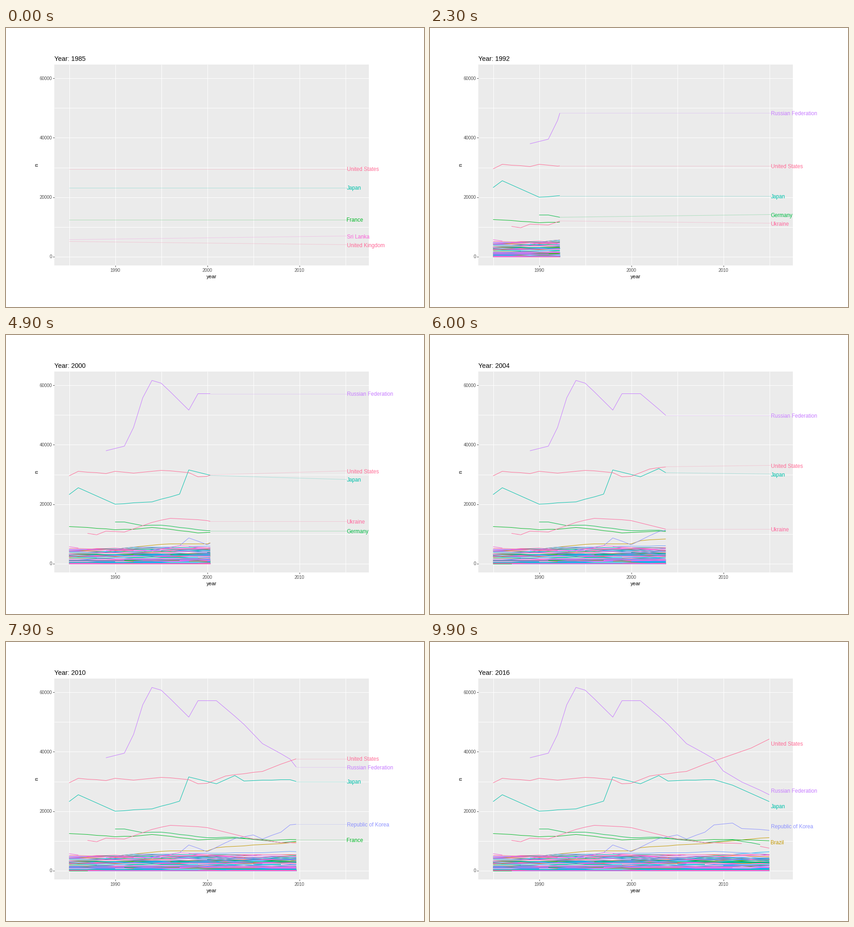
These frames come from a looping animation (917x611 px, 10000 ms). A matplotlib script:

```python
import numpy as np
import matplotlib.pyplot as plt
from matplotlib.animation import FuncAnimation
from matplotlib.patches import Rectangle

W, H, DPI = 917, 611, 64
PX = 72 / DPI                     # one pixel in points
FRAMES, FIRST, LAST = 100, 1985, 2015
YEARS = np.arange(FIRST, LAST + 1)
KEYS = np.round(np.arange(32) * (FRAMES - 1) / 31)   # frame of each year
LABEL_X, GAP, DODGE = 747.5, 18.5, 9.5

plt.rcParams["font.family"] = "Liberation Sans"
rng = np.random.default_rng(12)
fig = plt.figure(figsize=(W / DPI, H / DPI), dpi=DPI, facecolor="white")
ax = fig.add_axes([0, 0, 1, 1])
ax.set(xlim=(0, W), ylim=(H, 0))
ax.axis("off")


def year_x(year):
    return 138.4 + 20.2 * (year - FIRST)


def row(y):
    """Centre of the pixel that holds y, to keep flat lines crisp."""
    return np.floor(y) + 0.5


def hcl(hue, c=100, l=65):
    """Polar LUV colour, as in an evenly spaced hue palette."""
    a = np.radians(hue)
    u = c * np.cos(a) / (13 * l) + 0.1978
    v = c * np.sin(a) / (13 * l) + 0.4683
    y = ((l + 16) / 116) ** 3
    xyz = np.array([9 * y * u / (4 * v), y, y * (12 - 3 * u - 20 * v) / (4 * v)])
    m = np.array([[3.2406, -1.5372, -0.4986],
                  [-0.9689, 1.8758, 0.0415],
                  [0.0557, -0.2040, 1.0570]])
    rgb = np.clip(m @ xyz, 0, 1)
    return np.where(rgb > 0.0031308, 1.055 * rgb ** (1 / 2.4) - 0.055, 12.92 * rgb)


def text(x, y, s, px, color="black", **kw):
    kw.setdefault("va", "baseline")
    return ax.text(x, y, s, fontsize=px * PX, color=color, zorder=9, **kw)


def rule(xs, ys, color, z=1, **kw):
    return ax.plot(xs, ys, color=color, lw=PX, solid_capstyle="butt",
                   zorder=z, **kw)[0]


# Panel, grid and axes
ax.add_patch(Rectangle((106, 80), 690, 440, fc="#EBEBEB", ec="none", zorder=0))
for year in range(1985, 2016, 5):
    x = row(year_x(year))
    rule([x, x], [80, 520], "white")
    if year in (1990, 2000, 2010):
        rule([x, x], [520, 523], "#333333")
        text(x, 534, str(year), 9.9, "#4D4D4D", ha="center")
for n in range(0, 60001, 10000):
    y = row(500.7 - n * 130.4 / 20000)
    rule([106, 796], [y, y], "white")
    if n % 20000 == 0:
        rule([103, 106], [y, y], "#333333")
        text(101, y + 4, str(n), 9.9, "#4D4D4D", ha="right")
text(451, 548.5, "year", 11.4, ha="center")
text(67, 300, "n", 11.4, ha="center", va="center", rotation=90)
title = text(105.5, 71.5, "", 14.2)

# Series: heights are stage pixels, one per year, nan where data is missing
series, named = [], {}


def add(hue, levels, name=None):
    color = hcl(hue)
    series.append((rule([], [], color, 2 + hue / 400), row(levels)))
    if name:
        seg = rule([], [], color, 3, alpha=0.27)
        named[name] = (levels, seg, text(LABEL_X, 0, name, 11.6, color))


def country(name, hue, *points):
    """A series through a few (year, level) turning points."""
    xs, ys = zip(*points)
    add(hue, np.interp(YEARS, xs, ys, np.nan, np.nan), name)


country("United States", 358, (1985, 308), (1986, 298.5), (1989, 303),
        (1990, 298.5), (1992, 302), (1995, 296), (1998, 301), (1999, 310),
        (2000, 309), (2002, 293.5), (2006, 283), (2009, 260), (2013, 232),
        (2015, 212))
country("Japan", 181, (1985, 349), (1986, 334.5), (1988, 352.5), (1990, 370.5),
        (1994, 365), (1997, 348.5), (1998, 295.5), (2001, 310.5),
        (2003, 292.5), (2004, 304), (2009, 301), (2011, 313), (2015, 349))
country("Russian Federation", 285, (1989, 253), (1991, 243.5), (1992, 202),
        (1993, 137), (1994, 99.5), (1995, 105), (1998, 164), (1999, 128),
        (2001, 128), (2004, 180), (2006, 222), (2009, 256), (2010, 282),
        (2012, 306), (2015, 334))
country("France", 131, (1985, 419), (1990, 426), (1992, 425), (1994, 421),
        (1999, 433), (2003, 429), (2007, 434), (2010, 432), (2015, 435))
country("Germany", 138, (1990, 409), (1991, 409), (1993, 417), (1995, 416),
        (2000, 428.5), (2003, 427.5), (2008, 439), (2011, 433), (2014, 443))
country("Ukraine", 354, (1987, 434), (1988, 437), (1989, 429), (1991, 431),
        (1994, 410), (1996, 401), (2000, 406), (2003, 421), (2005, 431),
        (2008, 439), (2012, 441))
country("Republic of Korea", 265, (1993, 474), (1997, 461), (1998, 444),
        (2000, 459), (2003, 430), (2005, 422), (2006, 431), (2008, 416),
        (2009, 400), (2011, 396.5), (2012, 408), (2015, 412))
country("Brazil", 66, (1985, 473), (1990, 469), (1995, 458), (2000, 457.5),
        (2001, 450), (2008, 441), (2015, 428))
country("Sri Lanka", 322, (1985, 463), (1986, 466))
country("United Kingdom", 357, (1985, 467), (1988, 468.5), (1992, 472))
country(None, 354, (2014, 447), (2015, 451))
country(None, 258, (1989, 472), (1992, 464), (1996, 464))
country(None, 256, (1998, 463), (2006, 461), (2009, 458), (2015, 465))
country(None, 232, (2000, 478), (2009, 468), (2015, 459))
country(None, 320, (1994, 473), (1997, 461), (2004, 472))

# Small series, packed ever closer towards zero
COUNT = 90
for i in range(COUNT):
    size = 0.6 + 31 * rng.random() ** 2
    drift = np.cumsum(rng.normal(0.002, 0.03, len(YEARS)))
    levels = 500.8 - np.clip(size * np.exp(drift), 0.3, 35)
    start = 0 if rng.random() < 0.65 else rng.integers(2, 16)
    stop = 31 if rng.random() < 0.8 else rng.integers(18, 31)
    levels[:start] = np.nan
    levels[stop:] = np.nan
    if rng.random() < 0.25:
        levels[rng.integers(3, 28)] = np.nan
    add(15 + 345 * i / COUNT, levels)


def leaders(k):
    now = [(lv[k], name) for name, (lv, *_) in named.items() if lv[k] == lv[k]]
    return {name for _, name in sorted(now)[:5]}


def spread(points):
    """Push neighbouring labels apart until they clear each other."""
    spots = dict(points)
    order = sorted(spots, key=spots.get)
    for _ in range(20):
        for a, b in zip(order, order[1:]):
            lack = GAP - (spots[b] - spots[a])
            if lack > 0:
                spots[a] -= lack / 2
                spots[b] += lack / 2
    return spots


def dodge(points):
    """Move labels off their points, down and up in turn."""
    order = sorted(points, key=points.get)
    return {name: points[name] + DODGE * (-1) ** i for i, name in enumerate(order)}


def at(levels, t):
    i = min(int(t), len(levels) - 2)
    if t == i:
        return levels[i]
    return levels[i] + (levels[i + 1] - levels[i]) * (t - i)


def update(frame):
    t = min(np.interp(frame, KEYS, np.arange(32)), 30)
    k = int(np.searchsorted(KEYS, frame, "right")) - 1
    done = k >= 30
    xs = np.append(year_x(YEARS[:int(t) + 1]), year_x(FIRST + t))
    for line, levels in series:
        line.set_data(xs, np.append(levels[:int(t) + 1], at(levels, t)))

    # A label shows while its country leads in both neighbouring years
    shown = leaders(30) if done else leaders(k) & leaders(k + 1)
    points = {name: at(named[name][0], t) for name in shown}
    spots = dodge(points) if done else spread(points)
    for name, (_, seg, tag) in named.items():
        on = name in shown
        tag.set_visible(on)
        seg.set_visible(on and not done)
        if on:
            tag.set_y(spots[name] + 5.3)
            seg.set_data([xs[-1], LABEL_X], row([points[name], spots[name]]))

    title.set_text(f"Year: {round(FIRST + 31 * frame / (FRAMES - 1))}")
    return []


anim = FuncAnimation(fig, update, frames=FRAMES, interval=100,
                     repeat=True, repeat_delay=0, blit=False)
plt.show()
```
